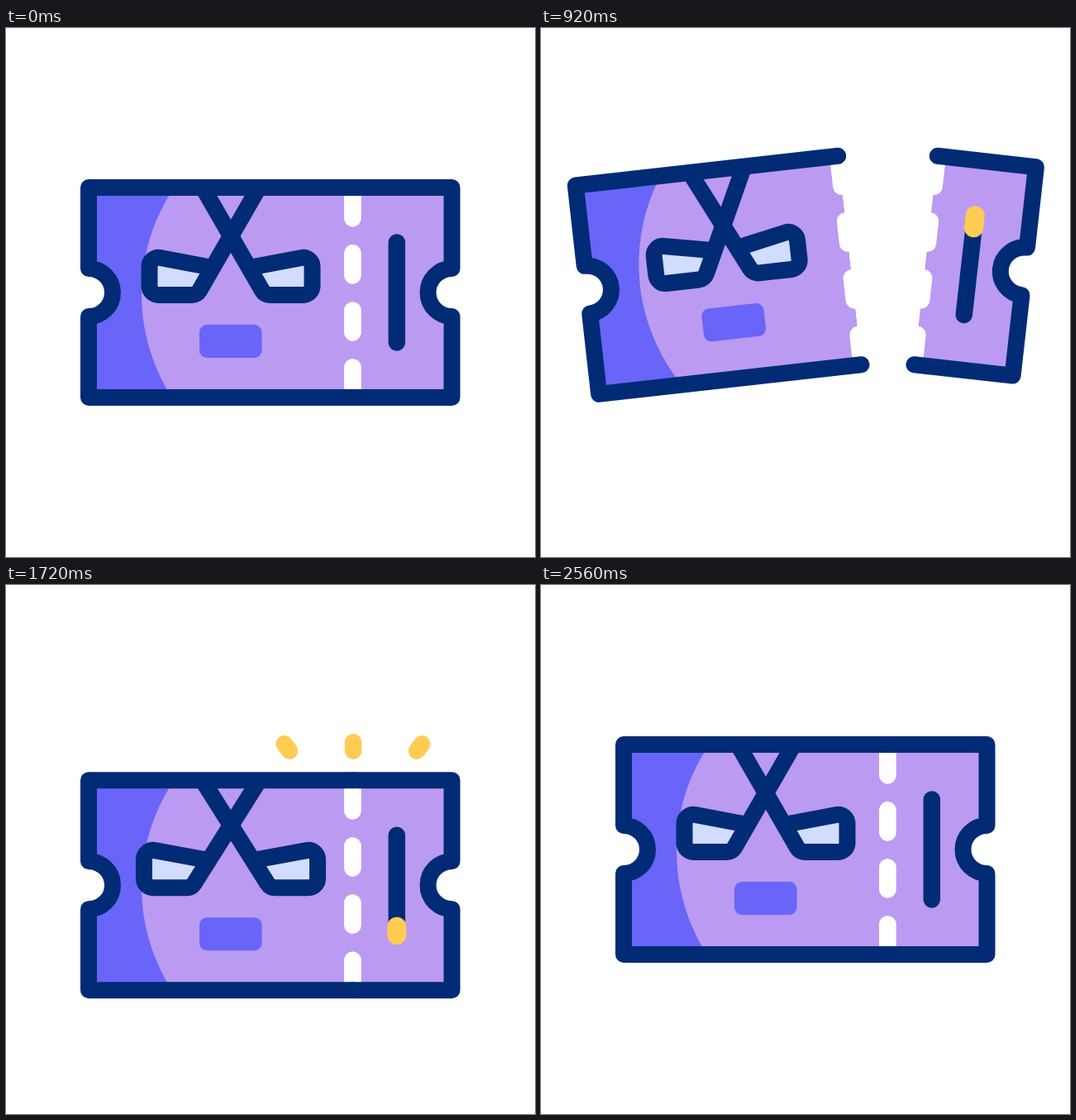
These frames come from a looping animation (640 px wide and 640 px high, 2.88 s). An HTML page with a canvas:

```html
<!DOCTYPE html>
<html lang="en">
<head>
<meta charset="utf-8">
<title>Ticket</title>
<style>
  html, body { margin: 0; width: 100%; height: 100%; overflow: hidden; background: #fff; }
  canvas { display: block; width: 640px; height: 640px; }
</style>
</head>
<body>
<canvas id="stage" width="640" height="640"></canvas>
<script>
const ctx = document.getElementById('stage').getContext('2d');
const LOOP = 2880, STEP = 20;
const NAVY = '#022b76', LILAC = '#bb9af2', BLUE = '#6865f8', YELLOW = '#ffcb52', GLASS = '#d2dcfe';
const TOP = 193, BOTTOM = 447, MIDDLE = 320, SEAM = 419.5;
const MAX_ANGLE = 8 * Math.PI / 180, MAX_SHIFT = 57.5;
const FLASHES = [560, 1694];

const LEFT = { sign: -1, far: 100 }, RIGHT = { sign: 1, far: 539.5 };

const smooth = u => u * u * (3 - 2 * u);
const easeIn = power => u => u ** power;
const easeOut = power => u => 1 - (1 - u) ** power;
const ramp = (t, from, to) => Math.min(1, Math.max(0, (t - from) / (to - from)));

// Moves run in order from rest at 0; the value holds between them.
const track = moves => t => moves.reduce(
  (value, m) => value + (m.to - value) * m.ease(ramp(t, ...m.during)), 0);

const lift = track([
  { during: [200, 400], to: 46, ease: smooth },
  { during: [430, 1360], to: -57, ease: easeOut(2.33) },
  { during: [1360, 1735], to: 60, ease: easeIn(3.8) },
  { during: [1735, 2110], to: -10, ease: easeOut(1.7) },
  { during: [2110, 2560], to: 0, ease: smooth }
]);
const opening = track([
  { during: [588, 1360], to: 1, ease: easeOut(2.87) },
  { during: [1360, 1695], to: 0, ease: easeIn(3.8) }
]);
const squeeze = track([
  { during: [200, 500], to: -8, ease: smooth },
  { during: [560, 1140], to: 20.5, ease: smooth },
  { during: [1360, 1725], to: -8, ease: easeIn(3.8) },
  { during: [1780, 2220], to: 17, ease: smooth },
  { during: [2240, 2560], to: 0, ease: smooth }
]);

// Part of a line between two fractions of its length.
function line(x0, y0, x1, y1, width, color, start = 0, end = 1) {
  if (end <= start) return;
  const dx = x1 - x0, dy = y1 - y0;
  ctx.beginPath();
  ctx.moveTo(x0 + dx * start, y0 + dy * start);
  ctx.lineTo(x0 + dx * end, y0 + dy * end);
  ctx.lineWidth = width;
  ctx.lineCap = 'round';
  ctx.strokeStyle = color;
  ctx.stroke();
}

function outline({ sign, far }) {
  ctx.beginPath();
  ctx.moveTo(SEAM, TOP);
  ctx.lineTo(far, TOP);
  ctx.lineTo(far, MIDDLE - 29);
  ctx.arc(far, MIDDLE, 29, -Math.PI / 2, Math.PI / 2, sign > 0);
  ctx.lineTo(far, BOTTOM);
  ctx.lineTo(SEAM, BOTTOM);
}

function paper(side) {
  ctx.save();
  outline(side);
  ctx.closePath();
  if (side === LEFT) {
    ctx.clip();
    ctx.fillStyle = BLUE;
    ctx.fillRect(90, 180, 340, 280);
    ctx.beginPath();
    ctx.arc(395, 322, 231, 0, Math.PI * 2);
  }
  ctx.fillStyle = LILAC;
  ctx.fill();
  ctx.restore();
  for (let i = 0; i < 4; i++) {
    const y = 203 + 69.2 * i;
    line(SEAM, y, SEAM, y + 27.2, 20.5, '#fff');
  }
}

function lens(shift) {
  const left = 173.5 + shift, corner = 231 + shift, run = 300 - corner;
  ctx.beginPath();
  ctx.moveTo(300 + run * 0.06, 196);
  ctx.arcTo(corner, 323, left, 323, 11);
  ctx.arcTo(left, 323, left, 275.3, 11);
  ctx.arcTo(left, 275.3, left + 76, 290.5, 11);
  ctx.lineTo(300 - run * 0.725, 290);
  ctx.fillStyle = GLASS;
  ctx.fill();
  ctx.lineWidth = 20;
  ctx.lineCap = 'butt';
  ctx.strokeStyle = NAVY;
  ctx.stroke();
}

function mask(shift) {
  lens(shift);
  ctx.save();
  ctx.translate(544, 0);
  ctx.scale(-1, 1);
  lens(shift);
  ctx.restore();
  ctx.beginPath();
  ctx.roundRect(234, 359, 75.5, 40, 9);
  ctx.fillStyle = BLUE;
  ctx.fill();
}

function bar(t) {
  const path = [472.8, 380.5, 472.8, 259.5];
  line(...path, 20.5, NAVY);
  for (const f of FLASHES) {
    line(...path, 23, YELLOW, ramp(t, f + 80, f + 400), ramp(t, f, f + 300));
  }
}

function ink(side, t) {
  if (side === LEFT) mask(squeeze(t));
  else bar(t);
  outline(side);
  ctx.lineWidth = 20;
  ctx.lineCap = 'round';
  ctx.strokeStyle = NAVY;
  ctx.stroke();
}

function sparks(t) {
  const y = 157.5;
  for (const f of FLASHES) {
    const start = ramp(t, f + 120, f + 280), end = ramp(t, f, f + 145);
    for (const k of [-1, 0, 1]) {
      const x = 420 + 77 * k;
      line(x, y, x + 34.5 * k, y - (k ? 46.6 : 58), 20.5, YELLOW, start, end);
    }
  }
}

function draw(t) {
  const open = opening(t);
  ctx.fillStyle = '#fff';
  ctx.fillRect(0, 0, 640, 640);
  ctx.lineJoin = 'round';
  ctx.save();
  ctx.translate(0, lift(t));
  for (const layer of [paper, ink]) {
    for (const side of [LEFT, RIGHT]) {
      ctx.save();
      ctx.translate(SEAM + side.sign * MAX_SHIFT * open, MIDDLE);
      ctx.rotate(side.sign * MAX_ANGLE * open);
      ctx.translate(-SEAM, -MIDDLE);
      layer(side, t);
      ctx.restore();
    }
  }
  sparks(t);
  ctx.restore();
}

const begin = performance.now();
function tick() {
  const t = (performance.now() - begin) % LOOP;
  draw(Math.floor(t / STEP) * STEP);
  requestAnimationFrame(tick);
}
tick();
</script>
</body>
</html>
```
